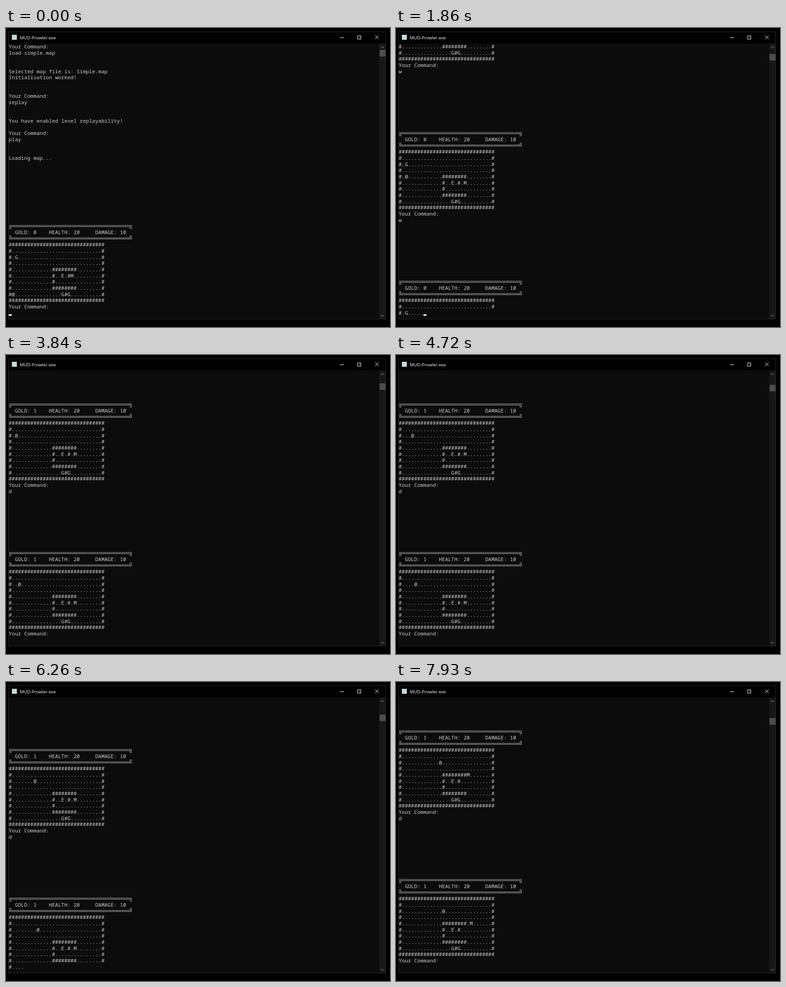
Write an HTML page that moves like this. It is 849 px wide and 660 px high and loops after 8 s.

```html
<!DOCTYPE html>
<html lang="en">
<head>
<meta charset="utf-8">
<title>Console dungeon</title>
<style>
  html, body { margin: 0; width: 100%; height: 100%; overflow: hidden; background: #000; }
  body { position: relative; }
  #frame { position: absolute; left: 0; top: 0; }
  #frame text { font: 9.8px "Open Sans", "Noto Sans", sans-serif; fill: #fff; }

  /* 8 x 16 character cells, shown at 41/48 size */
  #console {
    position: absolute; left: 6px; top: 34px; width: 960px; height: 704px;
    transform: scale(.854167); transform-origin: 0 0;
    font: 13.3333px/16px "Noto Sans Mono", "DejaVu Sans Mono", monospace;
    font-variant-ligatures: none; color: #ccc; white-space: pre;
  }
  .row { position: relative; height: 16px; }
  .top::before, .top::after, .bot::before, .bot::after {
    content: ""; position: absolute; box-sizing: border-box; border: 1px solid #ccc;
  }
  .top::before, .bot::before { left: 2px; width: 316px; height: 10px; }
  .top::after, .bot::after { left: 5px; width: 310px; height: 7px; }
  .top::before, .top::after { bottom: 0; border-bottom: 0; }
  .bot::before, .bot::after { top: 0; border-top: 0; }
  #cursor { position: absolute; top: 700px; width: 8px; height: 4px; background: #f2f2f2; }
</style>
</head>
<body>
<svg id="frame" width="849" height="660" viewBox="0 0 849 660">
  <rect x="5.5" y="8.5" width="834" height="634" fill="#000" stroke="#2b2b2b"/>
  <rect x="6" y="34" width="819" height="608" fill="#0c0c0c"/>
  <rect x="825" y="34" width="14" height="608" fill="#171717"/>
  <rect x="13" y="15" width="11" height="11" fill="#c3d9dc"/>
  <text x="30.5" y="24.5">MUD-Prowler.exe</text>
  <g fill="none" stroke="#fff">
    <path d="M738 21.5h9"/>
    <rect x="777.5" y="17.5" width="7" height="7"/>
    <path d="M816 16.5l8 8m0-8l-8 8"/>
  </g>
  <g fill="none" stroke="#6a6a6a" stroke-width="1.3">
    <path d="M829 44l3.2-3.4 3.2 3.4"/>
    <path d="M829 633.5l3.2 3.4 3.2-3.4"/>
  </g>
  <rect id="thumb" x="826" y="48.5" width="13" height="14.5" fill="#4d4d4d"/>
</svg>
<div id="console"></div>
<script>
const LOOP = 8000, ROWS = 44, CURSOR_OFF = 3600;
const TOP = '╔', BOT = '╚', PROMPT = 'Your Command:';
const dots = n => '.'.repeat(n), wall = n => '#'.repeat(n);

// time, player key, monster key, then for slow prints: duration, map row and column reached
const turns = [
  [140, 'd', '', 40, 3, 8], [510, 'w', 's'], [840, 'w', 'd', 40, 3, 8],
  [1210, 'w', '', 40, 3, 8], [1520, 'w', 'w'], [1860, 'w', '', 40, 2, 8],
  [2170, 'w', '', 50, 5, 8], [2970, 'e', '', 40, 8, 19], [3790, 'd', '', 50, 6, 8],
  [4300, 'd', '', 50, 4, 8], [4720, 'd', ''], [5100, 'd', '', 30, 8, 8],
  [5510, 'd', '', 50, 4, 8], [5880, 'd', ''], [6260, 'd', '', 40, 8, 5],
  [6640, 'd', '', 50, 8, 8], [7060, 'd', '', 40, 8, 8], [7340, 'd', 'd', 40, 8, 8],
  [7660, 'd', 'w', 50, 8, 8], [7930, 'd', 'd']
];

const hero = { x: 1, y: 8 }, monster = { x: 20, y: 5 };
let gold = 0;

function move(who, key) {
  if (key === 'w') who.y--;
  if (key === 's') who.y++;
  if (key === 'd') who.x++;
}

function drawMap() {
  const open = '#' + dots(29) + '#';
  const ledge = '#' + dots(13) + wall(8) + dots(8) + '#';
  const map = [
    wall(31), open, gold ? open : '#.G' + dots(27) + '#', open, ledge,
    '#' + dots(13) + '#..E.#' + dots(10) + '#',
    '#' + dots(13) + '#' + dots(15) + '#',
    ledge, '#' + dots(16) + 'G#G' + dots(10) + '#', wall(31)
  ];
  const put = (p, c) => map[p.y] = map[p.y].slice(0, p.x) + c + map[p.y].slice(p.x + 1);
  put(monster, 'M');
  put(hero, '@');
  return map;
}

const status = () => [TOP, `  GOLD: ${gold}    HEALTH: 20     DAMAGE: 10`, BOT];
const blank = n => Array(n).fill('');

const log = [
  PROMPT, 'load simple.map', '', '',
  'Selected map file is: Simple.map', 'Initialisation worked!', '', '',
  PROMPT, 'replay', '', '',
  'You have enabled level replayability!', '',
  PROMPT, 'play', '', '', 'Loading map...', ...blank(10),
  ...status(), ...drawMap(), PROMPT
];

// each step: the log is printed up to this line and column
const steps = [{ at: 0, line: log.length, col: 0 }];

for (const [at, key, monsterKey, slow = 0, mapRow, col] of turns) {
  move(hero, key);
  move(monster, monsterKey);
  if (key === 'e') gold = 1;
  log.push(key, ...blank(9), ...status());
  if (!gold && hero.x === 2 && hero.y === 2) log.push(" Press 'E' to collect the GOLD!");
  if (slow) steps.push({ at, line: log.length + mapRow, col });
  log.push(...drawMap(), PROMPT);
  steps.push({ at: at + slow, line: log.length, col: 0 });
}

const view = document.getElementById('console');
const thumb = document.getElementById('thumb');
const rows = Array.from({ length: ROWS }, () => {
  const row = document.createElement('div');
  row.className = 'row';
  return view.appendChild(row);
});
const cursor = document.createElement('div');
cursor.id = 'cursor';
view.appendChild(cursor);

let shown = null;

function show(step) {
  const first = step.line - ROWS + 1;
  rows.forEach((row, i) => {
    const text = i < ROWS - 1 ? log[first + i] : (log[step.line] || '').slice(0, step.col);
    const edge = text === TOP ? ' top' : text === BOT ? ' bot' : '';
    row.className = 'row' + edge;
    row.textContent = edge ? '' : text;
  });
  cursor.style.left = step.col * 8 + 'px';
  thumb.setAttribute('y', 48.5 + first * 0.065);
  shown = step;
}

function tick() {
  const t = performance.now() % LOOP;
  const step = steps.filter(s => s.at <= t).pop();
  if (step !== shown) show(step);
  cursor.style.visibility = t < CURSOR_OFF ? 'visible' : 'hidden';
  requestAnimationFrame(tick);
}
tick();
</script>
</body>
</html>
```
